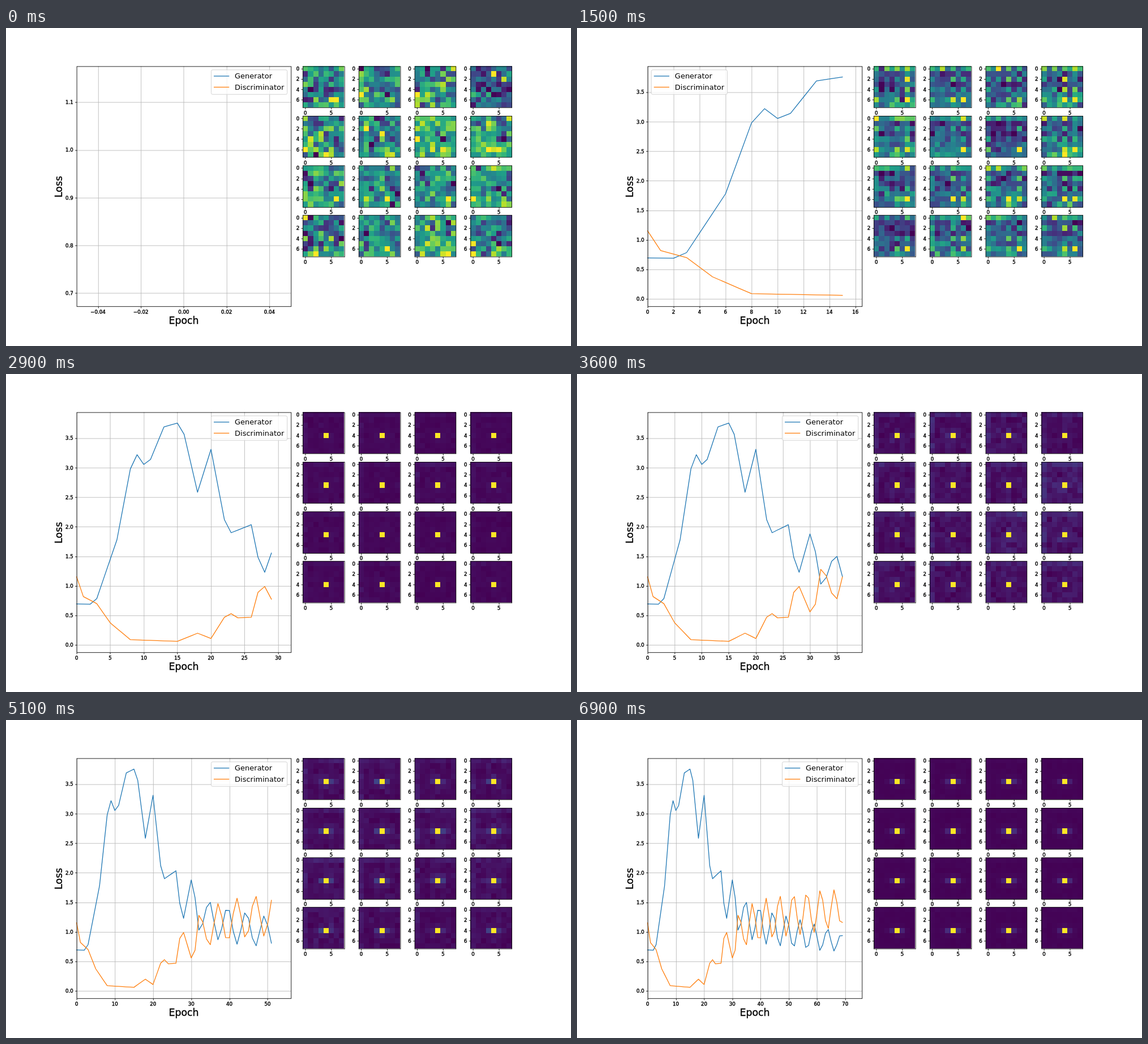
An HTML page that plays this animation: 998x561 px, repeating every 7100 ms.

```html
<!DOCTYPE html>
<html lang="en">
<head>
<meta charset="utf-8">
<title>Training progress</title>
<style>
html, body { margin: 0; width: 100%; height: 100%; overflow: hidden; background: #fff; }
svg { display: block; width: 998px; height: 561px; font-family: "DejaVu Sans", sans-serif; }
.tick { font-size: 10px; stroke: #000; stroke-width: .5px; }
.label { font-size: 20px; stroke: #000; stroke-width: .45px; }
.legend { font-size: 15px; }
.edge { fill: none; stroke: #000; stroke-width: 1; }
.grid { fill: none; stroke: #b8b8b8; stroke-width: 1; }
.loss { fill: none; stroke-width: 1.5; stroke-linejoin: round; stroke-linecap: square; }
</style>
</head>
<body>
<svg id="stage" viewBox="0 0 1152 648" preserveAspectRatio="none"></svg>
<script>
const STEP = 100, LOOP = 7100, LAST = 69, WAVE = 32;
const BLUE = '#1f77b4', ORANGE = '#ff7f0e';
const plot = { x: 144, y: 77.76, w: 436.9, h: 489.24 };
const tile = { x: 605.2, y: 77.76, size: 84.35, dx: 113.97, dy: 101.22 };

const stage = document.getElementById('stage');
const mix = (a, b, k) => a + (b - a) * k;
const clamp = v => Math.max(0, Math.min(1, v));
const snap = v => Math.floor(v + .5) + .5;
const bell = (x, mid, width) => Math.exp(-(((x - mid) / width) ** 2));
const spot = (c, r, x, y, width) => bell(c, x, width) * bell(r, y, width);

// Turning points [epoch, loss] before the two networks start to alternate
const genKeys = [[0, .695], [2, .69], [3, .785], [6, 1.78], [8, 2.98], [9, 3.22], [10, 3.055],
  [11, 3.14], [13, 3.69], [15, 3.755], [16, 3.565], [18, 2.585], [20, 3.31], [22, 2.12],
  [23, 1.9], [26, 2.035], [27, 1.485], [28, 1.23], [30, 1.88], [31, 1.58]];
const discKeys = [[0, 1.153], [1, .82], [3, .7], [5, .375], [8, .09], [15, .062], [18, .2],
  [20, .11], [22, .47], [23, .53], [24, .46], [26, .47], [27, .89], [28, .99], [30, .56], [31, .69]];

function along(keys, n) {
  const i = keys.findIndex(k => k[0] >= n);
  if (!i) return keys[0][1];
  const [a, b] = [keys[i - 1], keys[i]];
  return mix(a[1], b[1], (n - a[0]) / (b[0] - a[0]));
}

// 0 where the discriminator peaks, 1 where the generator does
function swing(n) {
  const u = (n - WAVE) / 4.84 % 1;
  return u < .6 ? (1 - Math.cos(Math.PI * u / .6)) / 2 : (1 - u) / .4;
}

const settle = n => Math.exp((WAVE - n) / 8);
const genLoss = n => n < WAVE ? along(genKeys, n)
  : mix(.67 + .36 * settle(n), 1.53 - .0165 * (n - 35), swing(n));
const discLoss = n => n < WAVE ? along(discKeys, n)
  : mix(1.72 - .44 * settle(n), .75 + .01 * (n - 35), swing(n));

const epochs = [...Array(LAST + 1).keys()];
const gen = epochs.map(genLoss), disc = epochs.map(discLoss);

// Heatmap stages: mean brightness of a cell and its noise
const even = v => v % 2 === 0;
const haze = n => .005 + .045 * bell(n, 42, 10);
const side = n => .08 + .28 * bell(n, 58, 6);
const dot = (c, r, n) => c === 4 && r === 4 ? 1
  : side(n) * bell(c, 4, 1.3) * bell(r, 4, .65) * 1.8 * clamp((n - 44) / 10)
  + haze(n) * (1 + (c && r ? 0 : 1.4) + spot(c, r, 4, 4, 1.5));
const stages = [
  { at: 0, noise: () => .36, mean: (c, r) =>
    .5 + (r > 5 ? .06 : 0) + .25 * spot(c, r, 5.4, 6, .8) - .2 * spot(c, r, 6, 4, 1.2) },
  { at: 9, noise: () => .1, mean: (c, r) =>
    .26 + (r > 4 ? .17 : 0) + (c > 3 && r > 1 && even(c) && even(r) ? .45 : 0)
    + .3 * spot(c, r, 6, 6, .6) + .2 * spot(c, r, 4, 7, 1) - .15 * spot(c, r, 2.5, 4, 1) },
  { at: 21, noise: () => .13, mean: (c, r) =>
    !r ? (even(c) ? .8 : .47) : !c && even(r) ? .52
    : .22 + .3 * spot(c, r, 2, 4, .8) - .1 * spot(c, r, 5, 3, 2) },
  { at: 29, noise: haze, mean: dot },
  { at: LAST, noise: haze, mean: dot }
];

const viridis = ['440154', '482878', '3e4989', '31688e', '26828e',
  '1f9e89', '35b779', '6ece58', 'b5de2b', 'fde725']
  .map(h => [0, 2, 4].map(i => parseInt(h.substr(i, 2), 16)));

function colour(v) {
  const p = clamp(v) * 9, i = Math.min(8, Math.floor(p));
  return `rgb(${viridis[i].map((c, k) => Math.round(mix(c, viridis[i + 1][k], p - i)))})`;
}

function random(seed) {
  let s = seed * 2654435761 + 12345 | 0;
  return () => {
    s = s + 0x6D2B79F5 | 0;
    let t = Math.imul(s ^ s >>> 15, 1 | s);
    t = t + Math.imul(t ^ t >>> 7, 61 | t) ^ t;
    return ((t ^ t >>> 14) >>> 0) / 4294967296;
  };
}

function add(parent, tag, attrs, text) {
  const el = document.createElementNS('http://www.w3.org/2000/svg', tag);
  for (const k in attrs) el.setAttribute(k, attrs[k]);
  if (text !== undefined) el.textContent = text;
  parent.appendChild(el);
  return el;
}

function frame(parent, x, y, w, h) {
  const l = snap(x), t = snap(y);
  add(parent, 'rect', { class: 'edge', x: l, y: t, width: snap(x + w) - l, height: snap(y + h) - t });
}

function xTick(parent, x, bottom, text) {
  add(parent, 'path', { class: 'edge', d: `M${snap(x)} ${snap(bottom)}v3.5` });
  add(parent, 'text', { class: 'tick', x, y: bottom + 14.6, 'text-anchor': 'middle' }, text);
}

function yTick(parent, left, y, text) {
  add(parent, 'path', { class: 'edge', d: `M${snap(left)} ${snap(y)}h-3.5` });
  add(parent, 'text', { class: 'tick', x: left - 7, y: y + 3.8, 'text-anchor': 'end' }, text);
}

// Static structure
const grid = add(stage, 'path', { class: 'grid' });
const genLine = add(stage, 'polyline', { class: 'loss', stroke: BLUE });
const discLine = add(stage, 'polyline', { class: 'loss', stroke: ORANGE });
frame(stage, plot.x, plot.y, plot.w, plot.h);
const ticks = add(stage, 'g', {});
add(stage, 'text', { class: 'label', x: 362.5, y: 603, 'text-anchor': 'middle' }, 'Epoch');
add(stage, 'text', { class: 'label', transform: 'translate(114.3 323.5) rotate(-90)', 'text-anchor': 'middle' }, 'Loss');

const legend = add(stage, 'g', { class: 'legend' });
add(legend, 'rect', { x: 418.4, y: 85.3, width: 155, height: 50, rx: 3,
  fill: '#fff', 'fill-opacity': .8, stroke: '#ccc' });
[['Generator', BLUE], ['Discriminator', ORANGE]].forEach(([name, stroke], i) => {
  add(legend, 'path', { class: 'loss', stroke, d: `M424.4 ${98 + i * 22.6}h30` });
  add(legend, 'text', { x: 466.4, y: 103 + i * 22.6 }, name);
});

const tiles = [...Array(16).keys()].map(k => {
  const x = tile.x + k % 4 * tile.dx, y = tile.y + Math.floor(k / 4) * tile.dy;
  const unit = tile.size / 8, cells = [];
  const g = add(stage, 'g', { 'shape-rendering': 'crispEdges' });
  for (let c = 0; c < 8; c++) for (let r = 0; r < 8; r++) {
    const rect = add(g, 'rect', { x: x + c * unit, y: y + r * unit, width: unit, height: unit });
    cells.push({ c, r, rect });
  }
  frame(stage, x, y, tile.size, tile.size);
  for (const v of [0, 5]) xTick(stage, x + (v + .5) * unit, y + tile.size, v);
  for (const v of [0, 2, 4, 6]) yTick(stage, x, y + (v + .5) * unit, v);
  return cells;
});

// Round tick values giving at most nine intervals
function tickList(lo, hi) {
  const raw = (hi - lo) / 9, mag = 10 ** Math.floor(Math.log10(raw));
  const step = [1, 2, 2.5, 5, 10].map(s => s * mag).find(s => s >= raw - 1e-9);
  const digits = [0, 1, 2, 3].find(d => Math.abs(step * 10 ** d - Math.round(step * 10 ** d)) < 1e-6);
  const list = [];
  for (let i = Math.ceil(lo / step - 1e-6); i * step <= hi + 1e-9; i++)
    list.push([i * step, (i * step).toFixed(digits).replace(/^-/, '\u2212')]);
  return list;
}

function drawPlot(n) {
  const g = gen.slice(0, n + 1), d = disc.slice(0, n + 1), all = g.concat(d);
  const min = Math.min(...all), max = Math.max(...all), pad = (max - min) * .05;
  const [x0, x1] = n ? [0, n * 1.1] : [-.05, .05];
  const y0 = min - pad, y1 = max + pad;
  const px = v => plot.x + (v - x0) / (x1 - x0) * plot.w;
  const py = v => plot.y + (y1 - v) / (y1 - y0) * plot.h;

  ticks.textContent = '';
  let path = '';
  for (const [v, text] of tickList(x0, x1)) {
    path += `M${snap(px(v))} ${plot.y}v${plot.h}`;
    xTick(ticks, px(v), plot.y + plot.h, text);
  }
  for (const [v, text] of tickList(y0, y1)) {
    path += `M${plot.x} ${snap(py(v))}h${plot.w}`;
    yTick(ticks, plot.x, py(v), text);
  }
  grid.setAttribute('d', path);

  const points = list => n ? list.map((v, i) => px(i).toFixed(2) + ',' + py(v).toFixed(2)).join(' ') : '';
  genLine.setAttribute('points', points(g));
  discLine.setAttribute('points', points(d));

  // The legend takes the first corner clear of the curves
  const corner = n < 4 || n > 23 ? '0 0' : n === 4 ? '-266.9 424.2' : '-266.9 0';
  legend.setAttribute('transform', `translate(${corner})`);
}

function drawTiles(n) {
  const i = Math.max(0, stages.findIndex(s => s.at >= n) - 1);
  const a = stages[i], b = stages[i + 1], k = (n - a.at) / (b.at - a.at);
  const noise = mix(a.noise(n), b.noise(n), k);
  const early = clamp(1 - n / 6);

  tiles.forEach((cells, t) => {
    const rnd = random(n * 16 + t + 1);
    const gamma = 2 ** (early * (rnd() * 1.2 - .6));
    const values = cells.map(({ c, r }) => {
      const m = mix(a.mean(c, r, n), b.mean(c, r, n), k);
      return m + (rnd() + rnd() + rnd() - 1.5) * (noise + .15 * m);
    });
    const lo = Math.min(...values), hi = Math.max(...values);
    cells.forEach(({ rect }, j) =>
      rect.setAttribute('fill', colour(((values[j] - lo) / (hi - lo)) ** gamma)));
  });
}

let shown = -1;
function update(time) {
  const n = Math.min(LAST, Math.floor(time % LOOP / STEP));
  if (n === shown) return;
  shown = n;
  drawPlot(n);
  drawTiles(n);
}

const begin = performance.now();
function tick(now) {
  update(Math.max(0, now - begin));
  requestAnimationFrame(tick);
}
tick(begin);
</script>
</body>
</html>
```
